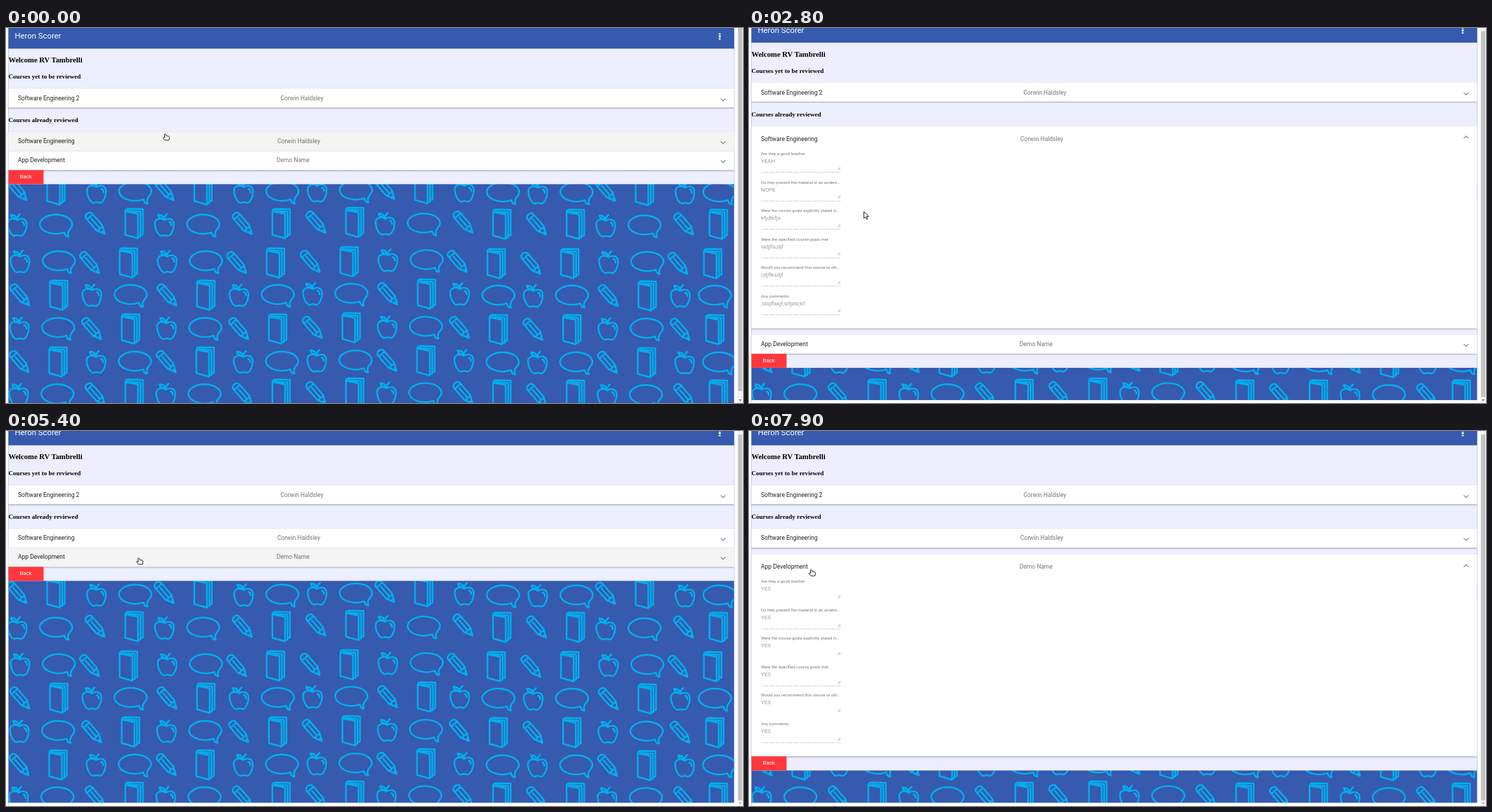
Animation of 1048 by 534 pixels, one loop 8000 ms. Source, as an HTML page:

```html
<!DOCTYPE html>
<html lang="en">
<head>
<meta charset="utf-8">
<title>Course reviews</title>
<style>
  html, body { margin: 0; width: 100%; height: 100%; overflow: hidden; background: #fff; }
  body { position: relative; font-family: Roboto, sans-serif; white-space: nowrap; }
  #stage { position: absolute; left: 0; top: 0; width: 1048px; height: 534px; overflow: hidden; }
  #stage div, #stage h3, #stage h4, #stage svg, #stage span { position: absolute; }
  #pattern { left: 0; top: 0; }
  #pattern g { fill: none; stroke: #00aeef; stroke-width: 2.4; stroke-linejoin: round; stroke-linecap: round; }
  #stage #page { left: 0; top: 0; width: 1032px; padding-top: 147.6px; background: #edeefe; }
  #margin { left: 0; top: 538px; width: 1034px; height: 20px; background: #fff; }

  .toolbar { left: 0; top: -1px; width: 100%; height: 30px; background: #365aae; color: #fff;
             font-size: 11.32px; line-height: 24px; }
  .toolbar span { left: 9.1px; }
  .toolbar i { position: absolute; left: 1010.4px; width: 2.4px; height: 2.4px; border-radius: 50%; background: #fff; }
  h3, h4 { margin: 0; left: 0; line-height: 12px; font-family: "Liberation Serif", serif; color: #000; }
  h3 { font-size: 10.6px; }
  h4 { font-size: 9.06px; }

  #stage .panel { position: relative; width: 1032px; background: #fff; color: rgba(0,0,0,.87);
    box-shadow: 0 1.7px .6px -1.1px rgba(0,0,0,.2), 0 1.1px 1.1px rgba(0,0,0,.14), 0 .6px 2.8px rgba(0,0,0,.12); }
  #stage .header { position: relative; height: 27.2px; font-size: 8.49px; }
  .header span { top: 50%; line-height: 12px; margin-top: -6px; }
  .header .title { left: 13.6px; }
  .header .teacher { color: rgba(0,0,0,.54); }
  .header .chevron { left: 1013.8px; width: 4.53px; height: 4.53px; margin-top: -2.27px; box-sizing: border-box;
    border: solid rgba(0,0,0,.54); border-width: 0 1.13px 1.13px 0; transform: rotate(45deg); }
  #stage .body { position: relative; height: 0; overflow: hidden; }
  .field { left: 13.6px; width: 113px; height: 31px; }
  .field span { left: 0; line-height: 10px; }
  .field .label { top: -1.7px; font-size: 5.95px; color: rgba(0,0,0,.54); }
  .field .value { top: 9.3px; font-size: 7.92px; color: rgba(0,0,0,.4); }
  .field .line { left: 0; top: 29.7px; width: 100%; height: .8px;
    background: repeating-linear-gradient(90deg, #a8a8a8 0 1px, transparent 1px 2.26px); }
  .field svg { left: 108px; top: 22.2px; stroke: #888; stroke-width: .7; }

  #stage .back { position: relative; width: 49.6px; height: 20.4px; background: #ff373c; color: #fff;
    font-size: 7.92px; line-height: 20.4px; text-align: center; }

  #track { left: 1040px; top: 0; width: 8px; height: 534px; background: #f1f1f1; }
  #thumb { left: 1px; top: -4px; width: 6px; height: 521px; background: #c1c1c1; }
  #arrowDown { left: 2px; top: 529px; border: solid transparent; border-width: 2.4px 2px 0; }
  #cursor { left: 0; top: 0; overflow: visible; }
  #cursor path { fill: #fff; stroke: #222; stroke-width: 1; stroke-linejoin: round; }
</style>
</head>
<body>
<div id="stage">
  <svg id="pattern" width="1048" height="534">
    <defs>
      <clipPath id="wall"><rect x="3.4" width="1032" height="534"/></clipPath>
      <g id="apple">
        <path d="M0-6.5C-5-10-13.5-9-13.5-1C-13.5 7-8 16-4 16C-2 16-1 15 .5 15S3 16 5 16C9 16 13.5 8 13.5 0C13.5-9 6-10 0-6.5Z"/>
        <path d="M0-7Q0-12 4-15M-1-9Q-8-8-9-14Q-2-14-1-9M7-4Q10-3 10 1"/>
      </g>
      <path id="bubble" d="M20 6.3A23 13.6 0 1 0 12 11.1C13 15 15 17.5 18 17C16.5 14 17 10 20 6.3Z"/>
      <g id="pencil" transform="rotate(49)">
        <path d="M9-5.5H-13Q-18-5.5-18 0T-13 5.5H9L20 0ZM-12-5.5V5.5M-9 0H9M9-5.5Q11.5-2.5 9 0Q11.5 2.5 9 5.5"/>
        <path fill="#00aeef" d="M16-2L20 0L16 2Z"/>
      </g>
      <path id="book" d="M-12.5-17L5.5-13.5V21.5L-12.5 16.5ZM-12.5-17Q-12-20.5-8-20.5L12.5-20V16L9.5 17M-9-17.5L9-16.5V19L5.5 20"/>
    </defs>
    <rect x="3.4" width="1032" height="534" fill="#365aae"/>
  </svg>

  <div id="page">
    <div class="toolbar"><span>Heron Scorer</span>
      <i style="top:7.9px"></i><i style="top:11.4px"></i><i style="top:14.9px"></i></div>
    <h3 style="top:39.8px">Welcome RV Tambrelli</h3>
    <h4 style="top:63.1px">Courses yet to be reviewed</h4>
    <div id="pending" style="top:86.2px"></div>
    <h4 style="top:124.7px">Courses already reviewed</h4>
  </div>
  <div id="margin"></div>

  <div id="track"><div id="thumb"></div><div id="arrowDown"></div></div>
  <svg id="cursor" width="12" height="14">
    <path id="arrow" d="M.3 .3V10L2.6 8L4.2 11.6L5.8 10.9L4.2 7.4H7.3Z"/>
    <path id="hand" d="M-.8 1Q.4-.2 1.3 1L2 3.2L5.4 3.6Q6.6 4.3 6.4 6.2L5.7 9.3H.1L-2.4 6.4Q-2.8 4.9-1.4 4.9L0 5.7Z"/>
  </svg>
</div>

<script>
const LOOP = 8000, STEP = 100, TOGGLE = 225;
const PAGE_X = 3.4, PAGE_Y = .4, MAX_SCROLL = 9;
const LIST_TOP = 148, CLOSED = 27.2, OPENED = 36.2, BODY = 251.8, GAP = 9;
const $ = id => document.getElementById(id);

// Wallpaper: two kinds of icon pairs alternate along each row; the last pair sits closer together.
const PAIRS = { A: ['apple', 'bubble'], B: ['pencil', 'book'] };
const CELLS = 10, LEADING_CELLS = [0, 2, 5, 8];
// [first pair, x and y of leading cells, x and y of the other cells]
const ROWS = [
  ['B', 16, 230, 24, 233], ['A', 16, 280, 22.5, 278], ['A', 20, 332, 14.5, 334], ['B', 20, 380, 17.5, 380],
  ['A', 19, 427, 17.5, 428], ['B', 19, 475, 23.5, 475], ['A', 18, 521.5, 22.5, 521]
];
let icons = '';
for (const [first, leadX, leadY, otherX, otherY] of ROWS) {
  for (let cell = 0; cell < CELLS; cell++) {
    const leads = LEADING_CELLS.includes(cell);
    const pair = PAIRS[leads === (first === 'A') ? 'A' : 'B'];
    const spacing = cell === CELLS - 1 ? 49 : 55;
    pair.forEach((icon, i) => {
      const x = (leads ? leadX : otherX) + cell * 104.6 + i * spacing;
      const shift = x < 425 ? 0 : x < 670 ? -1.7 : 1;
      icons += `<use href="#${icon}" x="${x}" y="${(leads ? leadY : otherY) + shift}"/>`;
    });
  }
}
$('pattern').insertAdjacentHTML('beforeend', `<g clip-path="url(#wall)">${icons}</g>`);

// Panels
const QUESTIONS = ['Are they a good teacher', 'Do they present the material in an unders…',
  'Were the course goals explicitly stated (v…', 'Were the specified course goals met',
  'Would you recommend this course to oth…', 'Any comments'];

function addPanel(parent, title, teacher, teacherX, answers = []) {
  const fields = answers.map((answer, i) => `<div class="field" style="top:${i * 40.5}px">
    <span class="label">${QUESTIONS[i]}</span><span class="value">${answer}</span>
    <svg width="5" height="5"><path d="M.5 4.5L4.5.5M2.7 4.5L4.5 2.7"/></svg><div class="line"></div></div>`).join('');
  parent.insertAdjacentHTML('beforeend', `<div class="panel"><div class="header">
    <span class="title">${title}</span><span class="teacher" style="left:${teacherX}px">${teacher}</span>
    <span class="chevron"></span></div><div class="body">${fields}</div></div>`);
  const root = parent.lastElementChild;
  const part = name => root.querySelector('.' + name);
  return { root, header: part('header'), body: part('body'), chevron: part('chevron') };
}

const page = $('page');
addPanel($('pending'), 'Software Engineering 2', 'Corwin Haldsley', 386.8);
const engineering = addPanel(page, 'Software Engineering', 'Corwin Haldsley', 382.4,
  ['YEAH', 'NOPE', 'kfjdlkfjs', 'ladjfls;djf', 'l;djflksdjf', ';ldsjflskjf;slfjdsl;kf']);
const development = addPanel(page, 'App Development', 'Demo Name', 381.3, Array(6).fill('YES'));
page.insertAdjacentHTML('beforeend', '<div class="back">Back</div>');

// Motion: [time, ...values], straight between the points
const SCROLL = [[2500, 0], [2600, 3], [2800, 8.5], [2900, 8.8], [3100, 9], [3200, 9], [3300, 8.5], [3400, 8.7], [3900, 9]];
const POINTER = [
  [0, 226, 150.5], [300, 229, 159], [900, 229, 159], [1300, 153.5, 195], [1600, 108.5, 204.5], [1700, 108.5, 206],
  [2000, 108.5, 206], [2300, 162, 264], [2400, 163, 261], [3200, 163, 261], [3900, 183.5, 152], [4100, 183.5, 152],
  [4200, 183, 152.5], [4900, 183, 152.5], [5300, 188, 180], [5400, 188.3, 180.5], [5900, 188.3, 180.5],
  [6200, 209, 296], [6300, 209, 296], [6400, 209, 297], [7200, 209, 297], [7600, 128.5, 223], [7700, 128.5, 223], [7900, 88, 197]
];
const ENGINEERING_OPENS = 780, ENGINEERING_CLOSES = 4494, DEVELOPMENT_OPENS = 5777;

function valuesAt(track, t) {
  const next = track.findIndex(point => point[0] > t);
  if (next === 0) return track[0].slice(1);
  if (next < 0) return track[track.length - 1].slice(1);
  const a = track[next - 1], b = track[next], k = (t - a[0]) / (b[0] - a[0]);
  return a.slice(1).map((v, i) => v + (b[i + 1] - v) * k);
}

// cubic-bezier(.4, 0, .2, 1) solved by bisection
function ease(x) {
  if (x <= 0) return 0;
  if (x >= 1) return 1;
  let low = 0, high = 1, u;
  for (let i = 0; i < 20; i++) {
    u = (low + high) / 2;
    if (1.2 * u * (1 - u) ** 2 + .6 * u * u * (1 - u) + u ** 3 < x) low = u; else high = u;
  }
  return u * u * (3 - 2 * u);
}
const toggled = (t, start) => ease((t - start) / TOGGLE);

// Lays out one panel and tells whether the pointer is over its header.
function layPanel(panel, top, amount, isOpen, pointerY) {
  const height = CLOSED + (OPENED - CLOSED) * amount;
  const hovered = pointerY >= top && pointerY < top + height;
  panel.header.style.height = height + 'px';
  panel.header.style.background = hovered && !isOpen ? '#f4f4f4' : '';
  panel.body.style.height = BODY * amount + 'px';
  panel.chevron.style.transform = `rotate(${45 + 180 * amount}deg)`;
  return { hovered, bottom: top + height + BODY * amount };
}

function render(t) {
  const [scroll] = valuesAt(SCROLL, t);
  const [x, y] = valuesAt(POINTER, t);
  const engAmount = toggled(t, ENGINEERING_OPENS) - toggled(t, ENGINEERING_CLOSES);
  const devAmount = toggled(t, DEVELOPMENT_OPENS);
  const gap = GAP * Math.max(engAmount, devAmount);

  const eng = layPanel(engineering, LIST_TOP, engAmount,
    t >= ENGINEERING_OPENS && t < ENGINEERING_CLOSES, y + scroll);
  const dev = layPanel(development, eng.bottom + gap, devAmount, t >= DEVELOPMENT_OPENS, y + scroll);
  development.root.style.marginTop = gap + 'px';

  page.style.transform = $('margin').style.transform = `translate(${PAGE_X}px, ${PAGE_Y - scroll}px)`;
  $('thumb').style.transform = `translateY(${scroll}px)`;
  $('arrowDown').style.borderTopColor = scroll < MAX_SCROLL ? '#505050' : '#a3a3a3';

  const overHeader = eng.hovered || dev.hovered;
  $('hand').style.display = overHeader ? '' : 'none';
  $('arrow').style.display = overHeader ? 'none' : '';
  $('cursor').style.transform = `translate(${x}px, ${y}px)`;
}

const start = performance.now();
function tick() {
  const t = (performance.now() - start) % LOOP;
  render(Math.floor(t / STEP) * STEP);
  requestAnimationFrame(tick);
}
tick();
</script>
</body>
</html>
```
